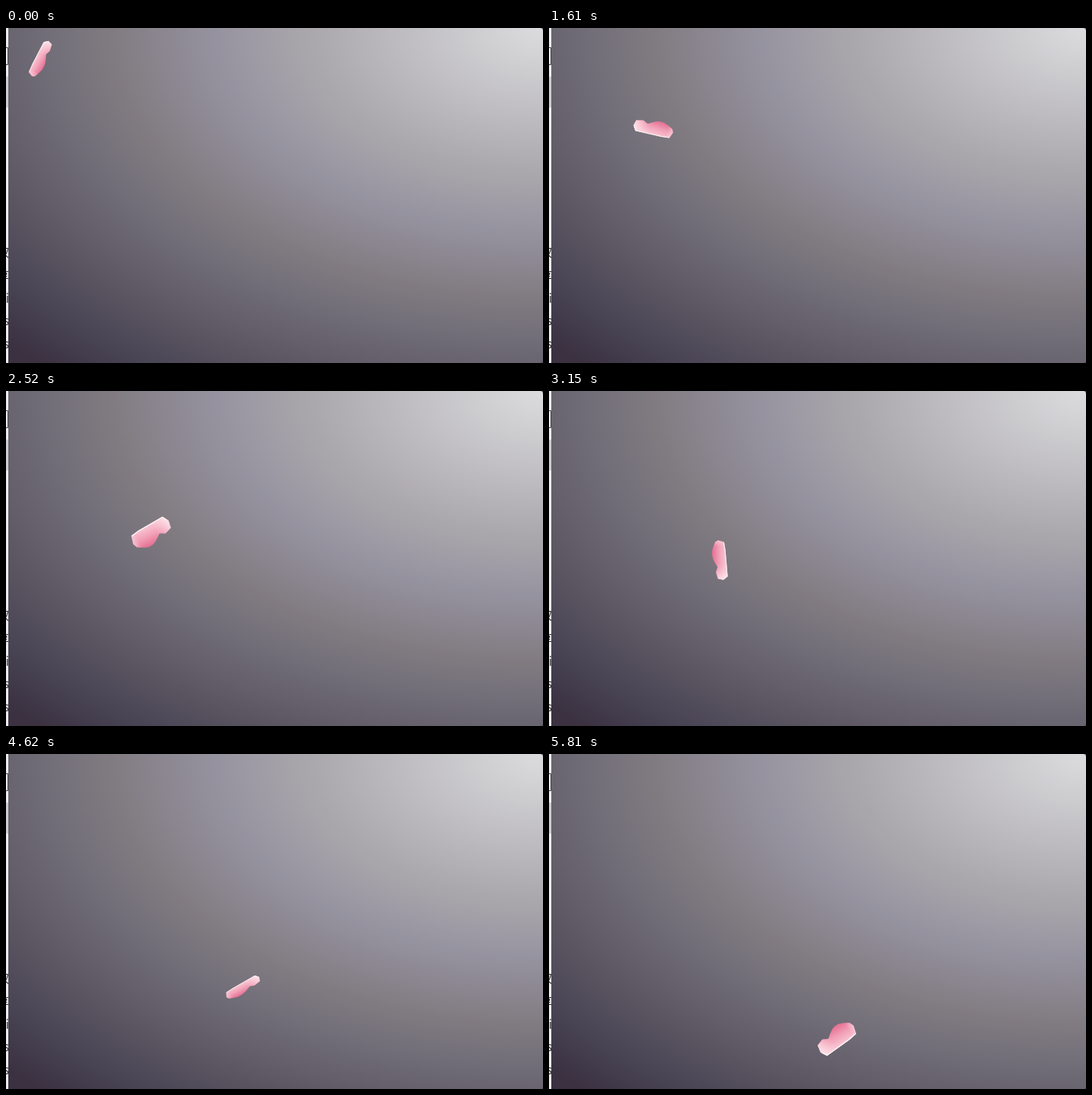
An HTML page for the animation above (5880 ms loop, 696x434 px).

```html
<!DOCTYPE html>
<html lang="en">
<head>
<meta charset="utf-8">
<title>Falling petal</title>
<style>
  html, body { margin: 0; width: 100%; height: 100%; overflow: hidden; background: #eceded; }
  svg { position: absolute; left: 0; top: 0; width: 696px; height: 434px; }
  .sky {
    position: absolute; left: 3px; top: 0; width: 693px; height: 434px;
    background: radial-gradient(ellipse farthest-corner at top right,
      #dcdcde, #aaa7ac 31%, #9693a0 43%, #817b81 57%,
      #726f79 65%, #5d5763 78%, #474353 89%, #3b3141 97%);
  }
  text { font: 15px "Noto Sans CJK SC", "Noto Sans CJK", "Noto Sans", sans-serif; fill: #333; text-anchor: end; }
</style>
</head>
<body>
<div class="sky"></div>
<svg viewBox="0 0 696 434">
  <defs>
    <clipPath id="strip"><rect width="3" height="434"/></clipPath>
    <linearGradient id="blush" x1="0.6" y1="0" x2="0.45" y2="1">
      <stop offset="0" stop-color="#e56f92"/>
      <stop offset="0.45" stop-color="#f19db5"/>
      <stop offset="1" stop-color="#f8cbd6"/>
    </linearGradient>
    <linearGradient id="pale">
      <stop offset="0" stop-color="#fff0f3" stop-opacity="0.8"/>
      <stop offset="0.4" stop-color="#fbd5de" stop-opacity="0"/>
      <stop offset="0.85" stop-color="#fbd5de" stop-opacity="0"/>
      <stop offset="1" stop-color="#fbe0e6" stop-opacity="0.6"/>
    </linearGradient>
    <path id="outline" d="M-26 -8L-16.6 -11L-9.6 -7.2Q-5 -11 .8 -14.4Q6 -17 12 -16Q19 -13 25 -8.6L27 -3L24 8L12.8 9.6L-23.5 10.4L-28 2Z"/>
  </defs>
  <g clip-path="url(#strip)">
    <rect y="63" width="3" height="40" fill="#cdcdce"/>
    <path d="M0 25.5H2.5V47.5H0" fill="none" stroke="#444"/>
    <text x="4" y="296">权</text>
    <text x="4" y="326">享</text>
    <text x="4" y="356">i</text>
    <text x="4" y="385">s</text>
    <text x="4" y="415">s</text>
  </g>
  <path d="M692 0H696V4Q696 0 692 0M692 434H696V430Q696 434 692 434" fill="#555"/>
  <g id="petal">
    <use href="#outline" fill="url(#blush)"/>
    <use href="#outline" fill="url(#pale)"/>
    <path d="M-26 4L-23 9.7L12 8.8L23.5 7.3" fill="none" stroke="#fff3f5" stroke-width="1.4" stroke-linejoin="round"/>
  </g>
</svg>
<script>
  const LOOP = 5.88, STEP = 0.07;
  const HALF_TUMBLE = 3.3, EDGE_ON = 0.7;  // seconds
  const petal = document.getElementById("petal");

  // Steady fall and spin; the tumble narrows the petal and makes its heading sway.
  function draw(t) {
    const tumble = Math.PI * (t - EDGE_ON) / HALF_TUMBLE;
    const width = 0.1 + 0.9 * Math.abs(Math.sin(tumble)) ** 1.3;
    const length = 0.8 + 0.2 * width;
    const heading = -245 + 162.5 * t + 14 * Math.cos(2 * tumble);
    const x = 44 + 56.8 * t, y = 40 + 56.7 * t;
    petal.setAttribute("transform",
      `translate(${x} ${y}) rotate(${heading}) scale(${length} ${width})`);
  }

  const start = performance.now();
  function tick() {
    const t = (performance.now() - start) / 1000 % LOOP;
    draw(Math.floor(t / STEP) * STEP);
    requestAnimationFrame(tick);
  }
  tick();
</script>
</body>
</html>
```
